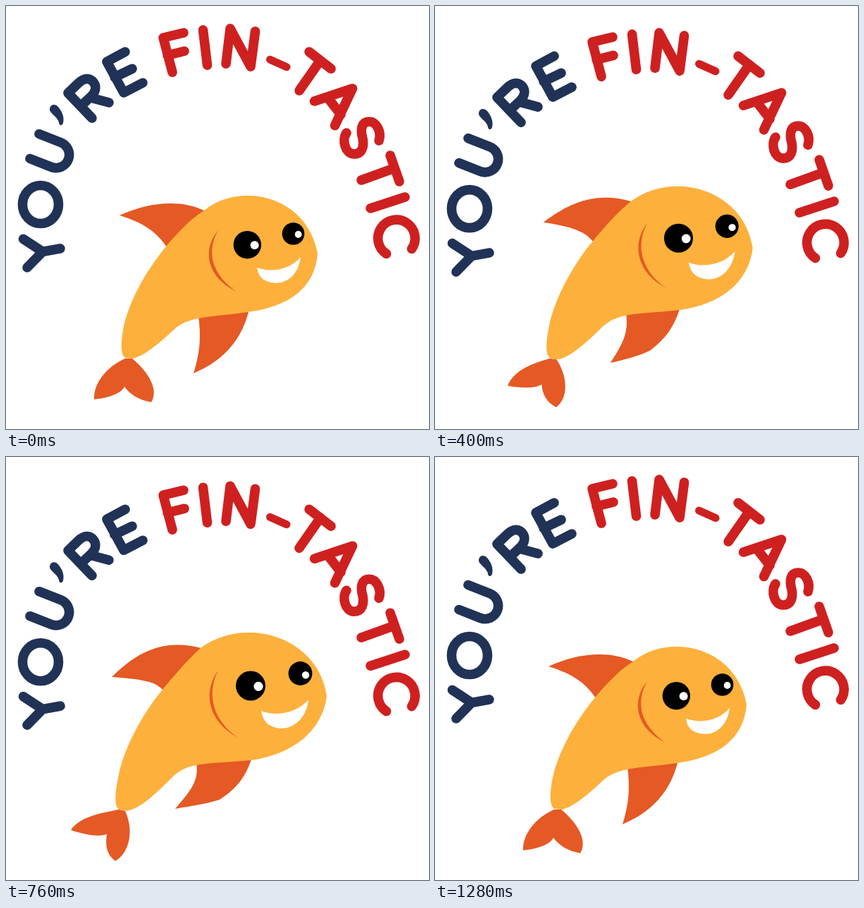
An HTML page with a canvas that plays this animation: 600x600 px, repeating every 1320 ms.

```html
<!DOCTYPE html>
<html lang="en">
<head>
<meta charset="utf-8">
<title>You're fin-tastic</title>
<style>
  html, body { margin: 0; width: 100%; height: 100%; overflow: hidden; background: #fff; }
  canvas { display: block; width: 600px; height: 600px; }
</style>
</head>
<body>
<canvas id="stage" width="600" height="600" role="img" aria-label="YOU’RE FIN-TASTIC"></canvas>
<script>
const ctx = document.getElementById('stage').getContext('2d');
const LOOP = 1320, STEP = 40;
const NAVY = '#203256', RED = '#cf2020', BODY = '#fdb03c', FIN = '#e55924';

// Rounded hand lettering, one stroked path per glyph
const navyGlyphs = [
  'M24.500 330.500L52 348.500L77 344M30 371L52 348.500',
  'M74.500 281.500A25.500 27 0 1 1 23.500 281.500A25.500 27 0 1 1 74.500 281.500Z',
  'M47 181.500L77.500 193.500A18.660 18.660 0 0 1 64.500 228.500L34 216.500',
  'M122 159L88 123.500L102 110C112 100 120 103 124 108C129 114 127 122 121 128L106 142M120 130L146 137',
  'M169 65L143 79L167 123L194 109M154 101L179 89'
].map(d => new Path2D(d));
const apostrophe = new Path2D(
  'M62 147C62 139 70 138 74 143C80 150 83 158 81 166C80 170 75 170 75 165C73 157 62 152 62 147Z');
const redGlyphs = [
  'M252 38L223 45L236 94M229 70L253 64',
  'M279.500 34L285.500 84',
  'M312 82L318 32L347 86L353.500 36',
  'M430 65L461 89M446 77L416 120',
  'M437.500 135L491.500 117L466.500 169.500M457 131L475 154',
  'M483 180C476 190 481 210 494 210C505 210 508 200 506 188C502 174 505 164 515 164C526 164 533 179 529 191',
  'M545 212L558 249M551 230L504 247',
  'M517 287L566 271',
  'M539.500 351.500A26.300 26.300 0 1 1 575.500 344.500'
].map(d => new Path2D(d));
const dash = new Path2D('M374.500 76L398 86.500');

// Fish parts in drawing order: colour, rest pose, raised pose
const parts = [
  [FIN,
    'M161 297C200 279 245 273 281 290L260 345L228 342C215 322 195 307 161 297Z',
    'M150 312C178 285 215 255 277 271L255 335L222 330C212 318 190 315 150 312Z'],
  [FIN,
    'M273 440C277 470 275 492 266 521C282 514 296 506 309 494C327 477 339 456 345 430Z',
    'M270 434C274 460 262 473 240 499C262 495 285 492 303 486C325 472 340 455 349 426Z'],
  [FIN,
    'M169 500C150 508 124 530 125 558C145 556 163 550 168 540C175 550 188 559 206 562C217 545 203 520 179 500Z',
    'M160 500C135 505 105 510 92 529C105 534 130 540 143 535C141 550 142 563 155 573C175 562 182 530 169 502Z'],
  [BODY,
    'M169 499C162 493 163 478 166 460C172 425 195 380 227 341C245 320 262 302 281 290C300 275 320 269 343 269' +
    'C388 269 432 297 442 351C438 400 402 426 344 434C320 438 292 439 273 443C255 447 245 452 237 460C220 476 195 498 179 500Z',
    'M160 500C154 494 154 480 159 455C165 420 190 368 222 330C240 308 258 287 276 271C296 256 320 249 345 249' +
    'C395 249 447 281 455 339C449 388 407 422 348 430C320 433 290 433 270 437C250 441 242 448 232 458C215 475 190 500 170 502Z'],
  [FIN,
    'M301 318C278 345 284 385 327 405C291 381 284 347 301 318Z',
    'M301 303C278 333 287 376 329 398C293 374 284 335 301 303Z'],
  ['#fff',
    'M356 371C375 378 402 375 418 356C415 380 400 393 383 393C366 392 358 385 356 371Z',
    'M362 360C383 369 413 363 429 344C427 368 410 385 391 385C372 384 364 374 362 360Z']
];

// Eyes: colour, then x, y, radius at rest and raised
const dots = [
  ['#000', [342.3, 338.8, 19.7], [347, 324.5, 21]],
  ['#fff', [352.6, 339.3, 6], [358, 325.3, 6.6]],
  ['#000', [407.5, 323, 15.8], [417.5, 307, 16.9]],
  ['#fff', [414.6, 324, 4.9], [425, 309.3, 5.2]]
];

const lerp = (a, b, p) => a + (b - a) * p;

function morph(from, to, p) {
  const ends = to.match(/[\d.]+/g);
  let i = 0;
  return new Path2D(from.replace(/[\d.]+/g, n => lerp(+n, +ends[i++], p).toFixed(2) + ' '));
}

// Steady rise, slightly quicker fall; the peak swings past the raised pose
function lift(t) {
  return Math.max(0, Math.min((t - 20) * 0.00175, 1 + (760 - t) * 0.00198));
}

function drawLettering(p) {
  ctx.save();
  ctx.translate(0, 9.2 * p);
  ctx.lineCap = ctx.lineJoin = 'round';
  ctx.lineWidth = 13.6;
  ctx.strokeStyle = ctx.fillStyle = NAVY;
  navyGlyphs.forEach(g => ctx.stroke(g));
  ctx.fill(apostrophe);
  ctx.strokeStyle = RED;
  redGlyphs.forEach(g => ctx.stroke(g));
  ctx.lineWidth = 11;
  ctx.stroke(dash);
  ctx.restore();
}

function drawFish(p) {
  for (const [color, rest, raised] of parts) {
    ctx.fillStyle = color;
    ctx.fill(morph(rest, raised, p));
  }
  for (const [color, rest, raised] of dots) {
    const [x, y, r] = rest.map((v, i) => lerp(v, raised[i], p));
    ctx.fillStyle = color;
    ctx.beginPath();
    ctx.arc(x, y, r, 0, Math.PI * 2);
    ctx.fill();
  }
}

function draw(time) {
  const p = lift(Math.floor((time % LOOP) / STEP) * STEP);
  ctx.fillStyle = '#fff';
  ctx.fillRect(0, 0, 600, 600);
  drawLettering(p);
  drawFish(p);
}

let start;
function tick(now) {
  start ??= now;
  draw(now - start);
  requestAnimationFrame(tick);
}
draw(0);
requestAnimationFrame(tick);
</script>
</body>
</html>
```
